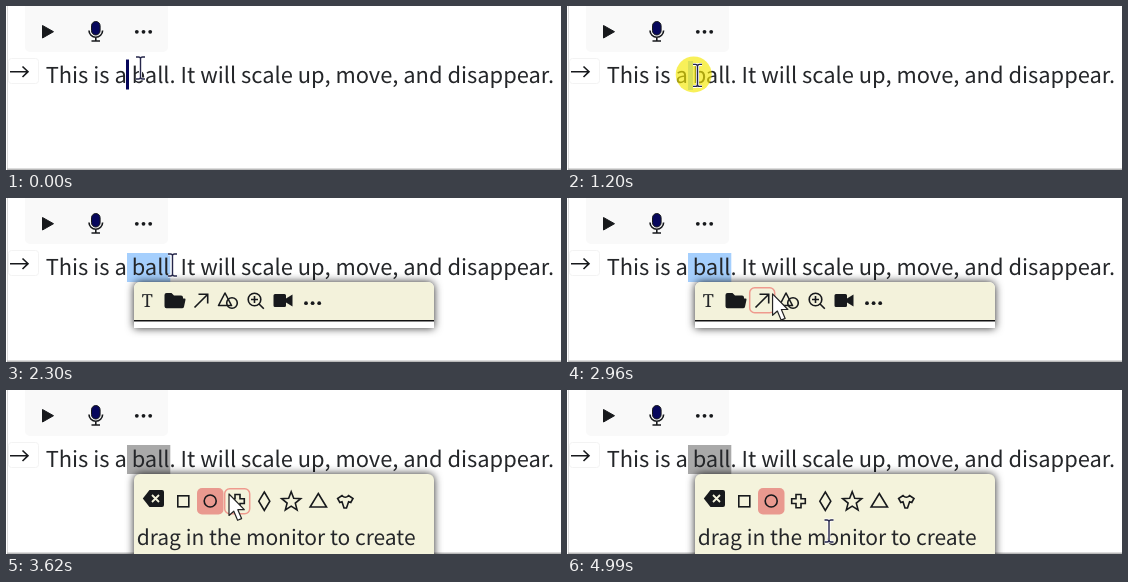
An HTML page that plays this animation: 555x164 px, repeating every 5060 ms.

```html
<!DOCTYPE html>
<html lang="en">
<head>
<meta charset="utf-8">
<title>Selecting a word to animate</title>
<style>
html, body { margin: 0; width: 100%; height: 100%; overflow: hidden; background: #fff; }
svg { display: block; }
text { font-family: "Noto Sans CJK JP", "Noto Sans CJK SC", "Noto Sans CJK", "Noto Sans", sans-serif; fill: #242629; text-rendering: geometricPrecision; }
.serif { font-family: "Noto Serif", "Liberation Serif", serif; }
.line { fill: none; stroke: #17191c; stroke-width: 1.6; }
.panel { filter: drop-shadow(0 0 4px rgba(0,0,0,.85)); }
.ink { fill: #17191c; }
</style>
</head>
<body>
<svg width="555" height="164" viewBox="0 0 555 164">
  <path d="M1.5 0V164" stroke="#dcdcdc"/>
  <path d="M1 163.3H555" stroke="#b9b9b9" stroke-width="1.4"/>

  <path d="M19 0H162V41a5 5 0 0 1-5 5H24a5 5 0 0 1-5-5Z" fill="#f9f9f9"/>
  <path class="ink" d="M36.5 19.5L47.5 25.7L36.5 32Z" stroke="#17191c" stroke-linejoin="round"/>
  <rect x="85.5" y="15.5" width="8.6" height="13.5" rx="4.3" fill="#07075c" stroke="#17191c"/>
  <path class="line" d="M83 24.5a6.8 6.8 0 0 0 13.6 0M89.8 31.5V35M85.5 35H94"/>
  <g class="ink"><circle cx="130.8" cy="25.8" r="1.9"/><circle cx="137.5" cy="25.8" r="1.9"/><circle cx="144.2" cy="25.8" r="1.9"/></g>

  <rect x="2.5" y="52.5" width="30" height="25" rx="3" fill="none" stroke="#f3f3f3"/>
  <path class="line" d="M4 65.7H22M16.5 60.5L22 65.7L16.5 71"/>

  <rect id="selection" x="121" y="55" height="29"/>
  <text x="39.7" y="77" font-size="21.9">This is a ball. It will scale up, move, and disappear.</text>
  <rect id="caret" x="120" y="53.5" width="3" height="30" fill="#06065a"/>

  <g id="tools">
    <g class="panel">
      <path d="M128 130V90a6 6 0 0 1 6-6H422a6 6 0 0 1 6 6V130Z" fill="#fff"/>
    </g>
    <path d="M128 122V90a6 6 0 0 1 6-6H422a6 6 0 0 1 6 6V122Z" fill="#f3f2db"/>
    <path d="M128 122.7H428" stroke="#111" stroke-width="1.4"/>
    <text class="serif" x="141.3" y="109" font-size="18" text-anchor="middle">T</text>
    <path class="ink" d="M158.5 97q0-2 2-2h5l2.5 2.5h7q2 0 2 2v1h1.5q1.2 0 1 1.2l-1.5 7q-.3 1.6-2 1.6h-15.500q-2 0-2-2Z"/>
    <path class="line" d="M188.500 109.500L201.500 96.500M192.500 96.300H201.700V105.500"/>
    <path class="line" stroke-linejoin="round" d="M219 95L225.500 107.500H212.500Z"/>
    <circle class="line" cx="226" cy="105" r="5.300"/>
    <path class="line" d="M252.800 105.800L257.800 110.800M245 101.500H252M248.500 98V105"/>
    <circle class="line" cx="248.500" cy="101.500" r="6.300"/>
    <path class="ink" d="M269 96H278.500q1.500 0 1.500 1.500V100.500L286.500 96.500V108.500L280 104.500V107.500q0 1.500-1.500 1.500H269q-1.500 0-1.500-1.500V97.500q0-1.500 1.500-1.500Z"/>
    <g class="ink"><circle cx="300" cy="105.200" r="1.900"/><circle cx="306.600" cy="105.200" r="1.900"/><circle cx="313.200" cy="105.200" r="1.900"/></g>
  </g>

  <g id="shapes">
    <g class="panel">
      <path d="M128 190V90a6 6 0 0 1 6-6H422a6 6 0 0 1 6 6V190Z" fill="#f4f3dc"/>
    </g>
    <path class="ink" d="M143.500 100H156q2 0 2 2V115q0 2-2 2H143.500L136.800 108.500Z"/>
    <path d="M146 105L153 112M153 105L146 112" stroke="#f4f3dc" stroke-width="1.800"/>
    <rect x="191" y="98" width="26.500" height="26.500" rx="5" fill="#e9998f"/>
    <g class="line">
      <rect x="171.800" y="105.800" width="11" height="11"/>
      <circle cx="204.200" cy="111" r="6"/>
      <path d="M229 104.500H234V108.800H238.300V113.500H234V117.800H229V113.500H224.700V108.800H229Z"/>
      <path d="M258.300 102L263.800 111.200L258.300 120.500L252.800 111.200Z"/>
      <path id="star"/>
      <path d="M312.300 103.500L320.500 117H304.100Z"/>
      <path d="M336 105.500Q339.300 109 342.600 105.500L347 108.500L344.800 112.500L342.600 111.700L340.500 118H338L336 111.700L333.800 112.500L331.600 108.500Z"/>
    </g>
    <text x="130.700" y="155" font-size="21">drag in the monitor to create</text>
  </g>

  <rect id="hover" width="25" height="25" rx="5" fill="none" stroke="#ef9a8e" stroke-width="1.500"/>
  <circle id="click" r="18" fill="#f5e800" fill-opacity=".65"/>
  <g id="beam" fill="none" stroke-linejoin="round">
    <path id="beamHalo" stroke="#fff" stroke-width="3"/>
    <path id="beamInk" stroke="#25264a" stroke-width="1.400"/>
  </g>
  <path id="arrow" d="M0 0V21.500L4.800 17.200L8.600 26.300L12.600 24.600L8.800 15.700H15.300Z" fill="#fff" stroke="#222" stroke-width="1.200" stroke-linejoin="round"/>
</svg>
<script>
const LOOP = 5060;
const $ = id => document.getElementById(id);
const set = (id, attrs) => {
  for (const key in attrs) $(id).setAttribute(key, attrs[key]);
};
const show = (id, on) => set(id, { visibility: on ? 'visible' : 'hidden' });
const place = (id, x, y) => set(id, { transform: `translate(${x} ${y})` });
const ease = p => 0.5 - 0.5 * Math.cos(Math.PI * p);

// start, end, steps, target x, target y, downward bow
const moves = [
  [70, 70, 1, 128.5, 62, 0],
  [210, 340, 3, 125, 68, 0],
  [1080, 1550, 8, 164, 68, 2],
  [2010, 2010, 1, 166.5, 67, 0],
  [2690, 3160, 8, 223, 104, 3.5],
  [4580, 4990, 7, 262, 141, 0]
];
const letterEdges = [121, 126, 139.5, 152, 158, 164.3];

function pointerAt(t) {
  let x = 134.5, y = 62;
  for (const [start, end, steps, toX, toY, bow] of moves) {
    if (t < start) break;
    const tick = (end - start) / (steps - 1) || 1;
    const step = Math.min(steps, Math.floor((t - start) / tick + 0.001) + 1);
    const p = ease(step / steps);
    x += (toX - x) * p;
    y += (toY - y) * p + bow * Math.sin(Math.PI * step / steps);
  }
  return [x, y];
}

function render(t) {
  const [x, y] = pointerAt(t);
  const toolsOpen = t >= 2300 && t < 3620;
  const shapesOpen = t >= 3620;
  show('tools', toolsOpen);
  show('shapes', shapesOpen);

  const nearest = letterEdges.reduce((a, b) => Math.abs(b - x) < Math.abs(a - x) ? b : a);
  const selected = t >= 1080 ? nearest - letterEdges[0] : 0;
  set('selection', { width: selected, fill: t < 3420 ? '#a5cffd' : '#a9a9a9' });
  show('caret', selected === 0);

  show('click', t >= 760 && t < 2150);
  place('click', x - 4, y - 1);

  const overTools = toolsOpen && y > 84;
  const isArrow = overTools || shapesOpen && y < 131;
  show('arrow', isArrow);
  show('beam', !isArrow);
  place('arrow', x, y);
  place('beam', Math.round(x * 2) / 2, y);

  const [left, top] = shapesOpen ? [164, 98] : [128, 89];
  show('hover', isArrow && y > top && y < top + 26);
  set('hover', { x: left + 27 * Math.floor((x - left) / 27) + 0.7, y: top + 0.7 });
}

const starPoints = Array.from({ length: 10 }, (_, i) => {
  const r = i % 2 ? 4.3 : 10, a = Math.PI * (i / 5 - 0.5);
  return `${285.2 + r * Math.cos(a)} ${111.8 + r * Math.sin(a)}`;
});
set('star', { d: `M${starPoints.join('L')}Z` });

const beamPath = 'M-4.500 -11H-2Q0 -11 0 -9V9Q0 11 -2 11H-4.500M4.500 -11H2Q0 -11 0 -9M0 9Q0 11 2 11H4.500';
set('beamHalo', { d: beamPath });
set('beamInk', { d: beamPath });

const began = performance.now();
function frame() {
  render((performance.now() - began) % LOOP);
  requestAnimationFrame(frame);
}
frame();
</script>
</body>
</html>
```
